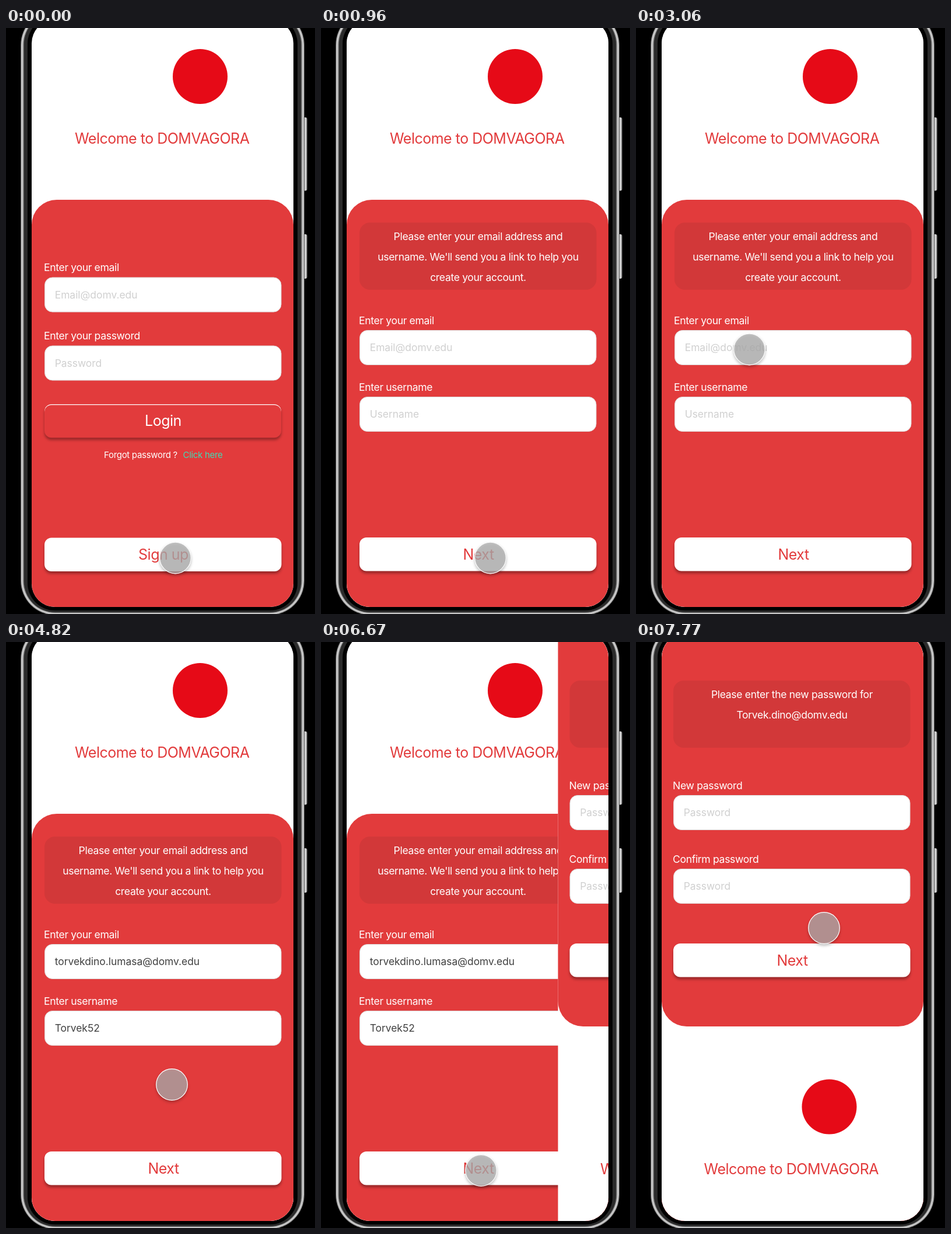
These frames come from a looping animation (530x1003 px, 8000 ms). An HTML page:

```html
<!DOCTYPE html>
<html lang="en">
<head>
<meta charset="utf-8">
<title>Sign-up flow</title>
<style>
  html, body { margin: 0; width: 100%; height: 100%; overflow: hidden; background: #000; }
  svg { display: block; width: 530px; height: 1003px; }
  text { font-family: Inter, sans-serif; fill: #fff; font-size: 17.6px; letter-spacing: -.35px; }
  .mid { text-anchor: middle; }
  .big { font-size: 25px; letter-spacing: -.5px; }
  .red { fill: #e23b3c; }
  .small { font-size: 15px; letter-spacing: -.3px; }
  .hint { fill: #d0d0d0; font-size: 17.4px; letter-spacing: 0; }
  .value { fill: #404040; font-size: 17.4px; letter-spacing: 0; }
  .raised { filter: drop-shadow(0 4px 2px rgba(0, 0, 0, .32)); }
  #cursor { filter: drop-shadow(0 3px 2px rgba(0, 0, 0, .28)); }
</style>
</head>
<body>
<svg id="stage" viewBox="0 0 530 1003"></svg>
<script>
const RED = '#e23b3c', LOOP = 8000;

const rect = (x, y, w, h, r, fill, extra = '') =>
  `<rect x="${x}" y="${y}" width="${w}" height="${h}" rx="${r}" fill="${fill}" ${extra}/>`;
const text = (x, y, str, cls = '', extra = '') =>
  `<text x="${x}" y="${y}" class="${cls}" ${extra}>${str}</text>`;
const field = (x, y, label, hint, hintClass = '') =>
  text(x - 1, y - 10.5, label) +
  rect(x + .5, y + .5, 405.5, 59, 13, '#fff', 'stroke="#dcd6d6"') +
  text(x + 17.7, y + 36, hint, 'hint ' + hintClass);
const button = (x, y, label) =>
  rect(x, y, 406.5, 57.5, 12, '#fff', 'class="raised"') +
  text(x + 204, y + 37.5, label, 'mid big red');
const brand = (cx, cy, titleX, titleY) =>
  `<circle cx="${cx}" cy="${cy}" r="47" fill="#e60a17"/>` +
  text(titleX, titleY, 'Welcome to DOMVAGORA', 'mid big red');
const note = (x, y, lines) =>
  rect(x, y, 406.5, 115, 18, '#d23839') +
  lines.map((line, i) => text(x + 203.5, y + 30 + i * 35, line, 'mid')).join('');
const sheet = (id, body) =>
  `<g id="${id}">${rect(44, -20, 449, 1011, 0, '#fff')}${body}</g>`;

const upperBrand = brand(333, 83, 267.7, 197.5);
const lowerPanel = rect(44, 294, 449, 760, 43, RED);

const login = sheet('login', upperBrand + lowerPanel +
  field(66, 426.5, 'Enter your email', 'Email@domv.edu') +
  field(66, 543.5, 'Enter your password', 'Password') +
  `<g class="raised">${rect(66, 644, 406, 30, 12, '#fff')}${rect(66, 645.3, 406, 56, 12, RED)}</g>` +
  text(269.5, 681, 'Login', 'mid big') +
  text(168, 736, 'Forgot password ?', 'small') +
  text(303.5, 736, 'Click here', 'small', 'style="fill:#3fdcb4"') +
  button(66, 872.5, 'Sign up'));

const signup = sheet('signup', upperBrand + lowerPanel +
  note(66, 333, ['Please enter your email address and',
    "username. We'll send you a link to help you", 'create your account.']) +
  field(66, 517, 'Enter your email', 'Email@domv.edu', 'empty') +
  field(66, 631, 'Enter username', 'Username', 'empty') +
  text(83.7, 553, 'torvekdino.lumasa@domv.edu', 'value') +
  text(83.7, 667, 'Torvek52', 'value') +
  button(66, 872, 'Next'));

const reset = sheet('reset',
  rect(44, -100, 449, 758, 43, RED) +
  note(64, 66, ['Please enter the new password for', 'Torvek.dino@domv.edu']) +
  field(64, 262, 'New password', 'Password') +
  field(64, 388, 'Confirm password', 'Password') +
  button(64, 516, 'Next') +
  brand(331.5, 795.5, 266.3, 910.5));

const phone =
  rect(509, 153, 7.5, 125.5, 3, 'url(#key)') +
  rect(509, 353, 7.5, 76, 3, 'url(#key)') +
  rect(25, -30, 487, 1035, 59, '#555') +
  rect(26, -29, 485, 1033, 58, '#c6c6c6') +
  rect(29.5, -26, 478, 1027, 55, '#606060') +
  rect(31, -25, 475, 1025, 53, '#2b2b2b') +
  rect(37, -20, 463, 1017, 47, '#000');

document.getElementById('stage').innerHTML = `
  <defs>
    <linearGradient id="key">
      <stop offset="0" stop-color="#777"/><stop offset=".6" stop-color="#ddd"/><stop offset="1" stop-color="#888"/>
    </linearGradient>
    <clipPath id="screen">${rect(44, -14, 449, 1005, 40, '#fff')}</clipPath>
  </defs>
  ${rect(0, 0, 530, 1003, 0, '#000')}${phone}
  <g clip-path="url(#screen)">${login}${signup}${reset}</g>
  <g id="cursor">
    <circle r="27.2" fill="#b0b0b0" fill-opacity=".745"/>
    <circle r="26.8" fill="none" stroke="#fff" stroke-width="1.2"/>
  </g>`;

// Each step holds until the next: [time, values...]
const signupSteps = [[0, 470], [550, 406], [680, 320], [830, 20], [960, 0]];
const resetSteps = [[0, 470], [6670, 362.5], [6800, 156], [6950, 6.8], [7080, 0]];
const typedSteps = [[0, 0], [3730, .5], [3860, 1]];
const cursorSteps = [
  [0, 290.5, 907],
  [1620, 306, 860], [1750, 350, 760], [1880, 367, 690], [1980, 355, 645], [2110, 331, 621],
  [2670, 300, 602], [2800, 240, 565], [2930, 200, 551], [3060, 194.5, 550],
  [4540, 225, 630], [4670, 277, 743], [4820, 284.5, 757.5],
  [5090, 293, 775], [5220, 288, 810], [5350, 272, 841],
  [5490, 255, 865], [5620, 250, 885], [5750, 262, 900], [5860, 274.5, 904.5],
  [7510, 300, 790], [7640, 327, 590], [7770, 322.5, 489.5],
];
const at = (steps, t) => steps.findLast(step => step[0] <= t).slice(1);

const el = id => document.getElementById(id);
const move = (id, x, y = 0) => el(id).setAttribute('transform', `translate(${x} ${y})`);
const fade = (selector, alpha) =>
  document.querySelectorAll(selector).forEach(node => node.setAttribute('opacity', alpha));

function draw() {
  const t = performance.now() % LOOP;
  const [typed] = at(typedSteps, t);
  move('signup', ...at(signupSteps, t));
  move('reset', ...at(resetSteps, t));
  move('cursor', ...at(cursorSteps, t));
  fade('.value', typed);
  fade('.empty', 1 - typed);
  requestAnimationFrame(draw);
}
draw();
</script>
</body>
</html>
```
